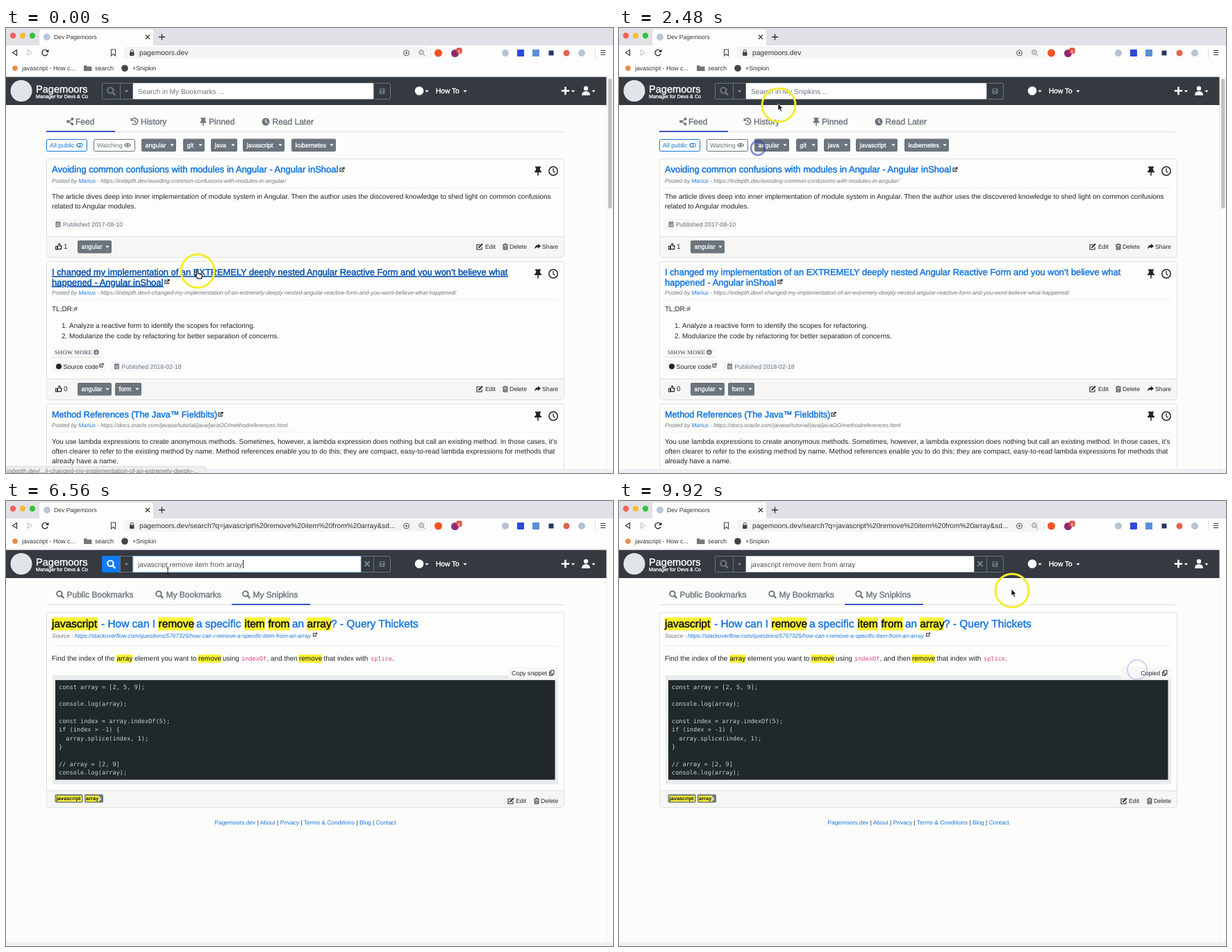
An HTML page for the animation above (10000 ms loop, 874 by 641 pixels).

```html
<!DOCTYPE html>
<html lang="en">
<head>
<meta charset="utf-8">
<title>Bookmark search</title>
<style>
  html, body { margin: 0; width: 100%; height: 100%; overflow: hidden; background: #fcfcfb; }
  svg { display: block; width: 874px; height: 641px; }
  text { font-family: "Liberation Sans", Arial, sans-serif; text-rendering: geometricPrecision; white-space: pre; }
  .mono { font-family: "DejaVu Sans Mono", monospace; }
  .serif { font-family: "Liberation Serif", serif; }
  .hover { fill: #0a55ad; stroke: #0a55ad; text-decoration: underline; }
</style>
</head>
<body>
<svg id="stage" viewBox="0 0 874 641"></svg>
<script>
const BLUE = '#1878dd', GREY = '#6c757d', DARK = '#212529', NAV = '#343a40', LINE = '#dfe0e1';

// Drawing helpers
const text = (x, y, s, size, fill = DARK, o = {}) =>
  `<text x="${x}" y="${y}" font-size="${size}" fill="${fill}"` +
  (o.medium ? ` stroke="${fill}" stroke-width="${o.medium}"` : '') +
  (o.italic ? ' font-style="italic"' : '') + (o.bold ? ' font-weight="700"' : '') +
  (o.anchor ? ` text-anchor="${o.anchor}"` : '') + (o.cls ? ` class="${o.cls}"` : '') +
  (o.id ? ` id="${o.id}"` : '') + `>${s}</text>`;
const rect = (x, y, w, h, fill, stroke = 'none', r = 0, extra = '') =>
  `<rect x="${x}" y="${y}" width="${w}" height="${h}" rx="${r}" fill="${fill}" stroke="${stroke}" ${extra}/>`;
const dot = (x, y, r, fill) => `<circle cx="${x}" cy="${y}" r="${r}" fill="${fill}"/>`;
const line = (d, color, w = 1, extra = '') =>
  `<path d="${d}" fill="none" stroke="${color}" stroke-width="${w}" ${extra}/>`;
const shape = (d, fill, extra = '') => `<path d="${d}" fill="${fill}" ${extra}/>`;
const at = (x, y, s) => `<g transform="translate(${x} ${y})">${s}</g>`;
const group = (id, s) => `<g id="${id}">${s}</g>`;

// Icons, centred on their position
const caret = (x, y, c = '#fff') => shape(`M${x - 2.7} ${y - 1.3}h5.4l-2.7 3z`, c);
const lens = (x, y, c, k = 1) => at(x, y, `<g transform="scale(${k})">` +
  `<circle cx="-1" cy="-1" r="3.6" fill="none" stroke="${c}" stroke-width="1.8"/>${line('M1.6 1.6L5 5', c, 2.2)}</g>`);
const pin = (x, y, c = DARK, k = 1) => at(x, y, `<g transform="scale(${k})">` +
  shape('M-4-6.5h8v2h-1.3l.5 3.5q2 .8 2 3h-4.4v4l-.8 1.5l-.8-1.5v-4h-4.4q0-2.2 2-3l.5-3.5h-1.3z', c) + '</g>');
const clock = (x, y) => `<circle cx="${x}" cy="${y}" r="6.2" fill="none" stroke="${DARK}" stroke-width="1.5"/>` +
  line(`M${x} ${y - 4}v4.3l2.6 2`, DARK, 1.3);
const external = (x, y, k = 1) => at(x, y, `<g transform="scale(${k})">` +
  line('M0-2.2h-3v5h5v-2.4M-1 1L3-3M.5-3h2.6v2.6', DARK, 1.1) + '</g>');
const calendar = (x, y) => rect(x - 3.5, y - 3.5, 7, 7.5, GREY, 'none', 1) +
  line(`M${x - 3} ${y - 1}h6M${x - 3} ${y + 1.4}h6M${x - 1} ${y - 1}v5M${x + 1.2} ${y - 1}v5`, '#f4f4f4', .6) +
  line(`M${x - 1.8} ${y - 5}v2M${x + 1.8} ${y - 5}v2`, GREY);
const edit = (x, y) => line(`M${x + 1} ${y - 3}h-5v7h7v-3.5`, DARK, 1.1) +
  line(`M${x - 1.6} ${y + 1.6}L${x + 4} ${y - 4}`, DARK, 1.9);
const trash = (x, y) => line(`M${x - 3.7} ${y - 2.8}h7.4M${x - 1.3} ${y - 4}h2.6M${x - 2.8} ${y - 2.4}v6.4h5.6v-6.4M${x - 1} ${y - 1}v4M${x + 1} ${y - 1}v4`, DARK, 1);
const share = (x, y) => shape(`M${x + 4.5} ${y - .8}l-4-3.4v2q-5 .2-4.6 5.6q1.4-2.8 4.6-2.6v2z`, DARK);
const thumb = (x, y) => rect(x - 4.6, y - .6, 2.2, 4.6, 'none', DARK) +
  line(`M${x - 1.6} ${y + 3.6}v-4l2-4q2 0 1 3.2h2.6l-.7 4.8z`, DARK, 1.2);
const save = (x, y) => rect(x - 4, y - 4, 8, 8, GREY, 'none', 1) + rect(x - 2.4, y - 3, 4, 2.2, NAV) + dot(x, y + 1.8, 1.2, NAV);

const pill = (x, y, w, label) => rect(x, y, w, 18.5, GREY, 'none', 2) +
  text(x + 5.5, y + 12.3, label, 9, '#fff', { medium: .3 }) + caret(x + w - 6, y + 9);
const title = (id, rows) => `<g id="${id}">` +
  rows.map(([y, s, size]) => text(66, y, s, size, BLUE, { medium: .5 })).join('') + '</g>';
const posted = (y, url) => text(66, y, `Posted by <tspan fill="${BLUE}">Marius</tspan> - ${url}`, 8.17, GREY, { italic: true });
const rule = y => line(`M66 ${y}h729`, LINE, 1, 'stroke-dasharray="1 1"');
const published = (x, y, date) => rect(x - 5, y - 8, 102, 16, '#f6f7f8', 'none', 2) + calendar(x + 4, y) +
  text(x + 11, y + 3.1, 'Published ' + date, 8.8, GREY);
const card = (y, h, foot) => rect(58.5, y + .5, 745, h, '#fdfdfc', LINE, 3) +
  (foot ? rect(59, foot, 744, y + h - foot, '#f6f6f5') + line(`M59 ${foot + .5}h744`, LINE) : '');
const cardFoot = (y, likes) => thumb(76, y) + text(83, y + 3.4, likes, 10) + pill(103, y - 9, 49, 'angular') +
  edit(682, y) + text(690, y + 3.2, 'Edit', 8.7) + trash(719, y) + text(725, y + 3.2, 'Delete', 8.7) +
  share(765.5, y) + text(772, y + 3.2, 'Share', 8.7);
const corner = y => pin(766, y) + clock(788, y);
const body = (y, s, x = 66) => text(x, y, s, 9.97);
const tabBar = (x, w) => line('M58 149.500h746', LINE) + rect(x, 148, w, 2, '#3b52c4');

const URL_SHORT = 'pagemoors.dev';
const URL_LONG = URL_SHORT + '/search?q=javascript%20remove%20item%20from%20array&amp;sd...';
const QUERY = 'javascript remove item from array';

const browser = rect(0, 0, 874, 641, '#fcfcfb') + rect(0, 0, 874, 25, '#dfe1e6') +
  shape('M48 25V5q0-3 3-3H209q3 0 3 3V25z', '#fdfdfd') +
  ['#f25f57', '#f8bc30', '#34c23f'].map((c, i) => dot(10 + 14 * i, 11, 4.2, c)).join('') +
  dot(59, 13, 5, '#b8c8d8') + text(69, 16.2, 'Dev Pagemoors', 8.65, '#333') +
  line('M201 10l6 6m0-6l-6 6', '#333', 1.2) + line('M224.500 8.500v9m-4.500-4.500h9', '#333', 1.3) +
  rect(0, 25, 874, 46, '#fdfdfd') +
  line('M15.500 31.500v8l-6-4z', '#333', 1.2) + line('M31.500 31.500v8l6-4z', '#bbb') +
  line('M59.500 33a4.200 4.200 0 1 0 .6 4', '#333', 1.4) + shape('M61.500 30.500v4.500h-4.500z', '#333') +
  line('M151.500 31h6v9l-3-2.500l-3 2.500z', '#444', 1.1) +
  rect(170, 27, 438, 17, '#f3f4f5', 'none', 4) +
  rect(178, 34.5, 6.5, 5.5, '#444', 'none', 1) + line('M179.500 35v-2a1.800 1.800 0 0 1 3.600 0v2', '#444') +
  `<circle cx="576.500" cy="36" r="4" fill="none" stroke="#555"/>` + line('M574.500 36h4m-2-2v4', '#555') +
  `<circle cx="598" cy="35" r="3.300" fill="none" stroke="#777"/>` + line('M596.500 35h3M600.500 37.500l2.500 2.500', '#777') +
  line('M611.500 29v14M848.500 29v14', '#ddd') +
  dot(622.5, 36, 5.5, '#f05423') + dot(646.5, 36.5, 5.5, '#8c2a70') + rect(648.5, 28.5, 8, 8.5, '#e0493c', 'none', 2) +
  text(652.5, 35.5, '6', 7, '#fff', { anchor: 'middle' }) +
  dot(719, 36, 5, '#b5c3d2') + rect(736, 31, 10, 10, '#2d49d8', 'none', 1) + rect(758, 31, 10, 10, '#5b8fd8') +
  rect(781.5, 32.5, 7, 7, '#263763') + dot(807, 36, 4.5, '#e1644d') + dot(829, 36, 5, '#b5c3d2') +
  line('M856 32.500h7M856 35.500h7M856 38.500h7', '#333', 1.2) +
  dot(13, 58, 3.8, '#e78b46') + text(23, 60.7, 'javascript - How c...', 8.8, '#333') +
  shape('M112 54h4l1 1.500h6.500v6.500h-11.500z', '#777') + text(128, 60.7, 'search', 9, '#333') +
  dot(171, 58, 4.8, '#444') + text(182, 60.7, '+Snipkin', 8.9, '#333') +
  text(192, 39.2, URL_SHORT, 10.2, '#333', { id: 'address' });

const navbar = rect(0, 70.5, 864.5, 40.5, NAV) + dot(22, 90.5, 15.5, '#dfe5e9') +
  text(43, 92.8, 'Pagemoors', 14.6, '#fff', { medium: .4 }) +
  text(43, 100.8, 'Manager for Devs &amp; Co', 7.2, '#fff', { medium: .25 }) +
  group('searchIdle', rect(138.5, 79.5, 26, 23, 'none', GREY, 2) + lens(151.5, 91, GREY, 1.15)) +
  group('searchReady', rect(138, 79, 27, 24, '#0f7bf5', 'none', 2) + lens(151.5, 91, '#fff', 1.15)) +
  rect(164.5, 79.5, 18, 23, 'none', GREY, 0, 'id="toggle"') + caret(173.5, 91, '#8d959b') +
  rect(183, 79.3, 346, 23.2, '#fff', 'none', 0, 'id="input"') +
  group('focusLine', line('M183 79.500h328v23h-328z', '#9cc9ea', 1)) +
  text(190, 94.5, '', 10.15, '#6c757d', { id: 'field' }) + rect(341.5, 85, 1, 12, '#222', 'none', 0, 'id="beam"') +
  group('clear', rect(511.5, 79.5, 18, 23, NAV, GREY) + line('M516.500 87l7 7m0-7l-7 7', '#7f878d', 1.8)) +
  rect(529.5, 79.5, 24, 23, 'none', GREY, 2) + save(541.5, 91) +
  dot(595, 90.5, 6.3, '#fff') + caret(606, 91) + text(619, 94.3, 'How To', 10.2, '#fff', { medium: .35 }) + caret(661, 91) +
  line('M805.500 84.800v11.400m-5.700-5.700h11.400', '#fff', 2.6) + caret(816.5, 91) +
  dot(835, 87, 3.2, '#fff') + shape('M829 97q0-6 6-6t6 6z', '#fff') + caret(846, 91);

const tab = (x, s) => text(x, 139.2, s, 12, GREY, { medium: .4 });
const feed = tabBar(58, 99) +
  line('M96 131l-6.500 3.700l6.500 3.700', GREY, 1.4) + dot(95.5, 131, 2, GREY) + dot(89, 134.7, 2, GREY) + dot(95.5, 138.4, 2, GREY) +
  tab(100, 'Feed') + line('M181.300 132a4.600 4.600 0 1 1 .4 5.500M185.500 132v3l2 1.500', GREY, 1.5) + shape('M179.500 129.500v4.500h4.500z', GREY) +
  tab(194, 'History') + pin(284, 135, GREY, .9) + tab(292, 'Pinned') +
  dot(374, 135, 5.5, GREY) + line('M374 131.500v3.700l2.400 1.600', '#fff', 1.3) + tab(383.5, 'Read Later') +
  rect(58.5, 160.5, 58, 17, 'none', BLUE, 2) + text(63, 172, 'All public', 8.9, BLUE) +
  rect(102, 166.3, 8.5, 5, 'none', BLUE, 2.5) + `<circle cx="104.500" cy="168.800" r="2.500" fill="none" stroke="${BLUE}"/>` +
  rect(126.5, 160.5, 59, 17, 'none', GREY, 2) + text(131, 172, 'Watching', 8.9, GREY) +
  line('M170.500 168.800q4.500-5.400 9 0q-4.500 5.400-9 0z', GREY, 1.2) + dot(175, 168.8, 1.6, GREY) +
  [[195, 50, 'angular'], [255, 31, 'git'], [295, 38, 'java'], [341, 60, 'javascript'], [411, 64, 'kubernetes']]
    .map(([x, w, s]) => pill(x, 159.5, w, s)).join('') +
  card(188, 142, 300) + title('title1', [[208, 'Avoiding common confusions with modules in Angular - Angular inShoal', 13]]) +
  external(484, 204) + corner(206) + posted(222.6, 'https://indepth.dev/avoiding-common-confusions-with-modules-in-angular/') + rule(230) +
  body(245.8, 'The article dives deep into inner implementation of module system in Angular. Then the author uses the discovered knowledge to shed light on common confusions') +
  body(260.3, 'related to Angular modules.') + published(71, 283, '2017-08-10') + cardFoot(315, '1') +
  card(336, 199, 505) + title('title2', [
    [356.3, 'I changed my implementation of an EXTREMELY deeply nested Angular Reactive Form and you won’t believe what', 12.86],
    [370.8, 'happened - Angular inShoal', 13]]) +
  external(232, 365.5) + corner(354) +
  posted(384, 'https://indepth.dev/i-changed-my-implementation-of-an-extremely-deeply-nested-angular-reactive-form-and-you-wont-believe-what-happened/') +
  rule(391) + body(407.5, 'TL;DR:#') +
  ['Analyze a reactive form to identify the scopes for refactoring.', 'Modularize the code by refactoring for better separation of concerns.']
    .map((s, i) => body(432.2 + 14.5 * i, `${i + 1}.`, 80) + body(432.2 + 14.5 * i, s, 91)).join('') +
  rect(66, 460, 73, 14, '#f8f8f7') + line('M66 474.500h73', LINE) +
  text(70, 470, 'SHOW MORE', 8.4, GREY, { cls: 'serif', bold: true }) + dot(130, 467, 3.8, GREY) + line('M130 464.800v4m-1.800-1.600l1.800 1.800l1.800-1.800', '#fff', .9) +
  rect(67, 479, 78, 16, '#f6f7f8', 'none', 2) + dot(76, 487.5, 4, DARK) + text(82.5, 490.6, 'Source code', 9, DARK) + external(137.5, 486, .85) +
  published(155.5, 487.5, '2018-02-18') + cardFoot(520, '0') + pill(157, 511, 38, 'form') +
  card(541, 110) + title('title3', [[561, 'Method References (The Java™ Fieldbits)', 12.7]]) + external(309, 556.5) + corner(559) +
  posted(574.8, 'https://docs.oracle.com/javase/tutorial/java/javaOO/methodreferences.html') + rule(582) +
  body(599, "You use lambda expressions to create anonymous methods. Sometimes, however, a lambda expression does nothing but call an existing method. In those cases, it's") +
  body(613.2, 'often clearer to refer to the existing method by name. Method references enable you to do this; they are compact, easy-to-read lambda expressions for methods that') +
  body(627.4, 'already have a name.') + rect(867, 73, 5.5, 187, '#c3c3c4', 'none', 2.7);

// Runs of text; those with a width are highlighted
const runs = (y, size, h, list, color, o) => list.map(([x, s, w]) =>
  (w ? rect(x - .5, y - h * .77, w, h, '#fcf536') : '') + text(x, y, s, size, w ? '#111' : color, o)).join('');
const code = ['const array = [2, 5, 9];', '', 'console.log(array);', '', 'const index = array.indexOf(5);', 'if (index &gt; -1) {',
  '  array.splice(index, 1);', '}', '', '// array = [2, 9]', 'console.log(array);'];
const link = s => `<tspan fill="${BLUE}">${s}</tspan>`;

const resultTabs = tabBar(325, 113) +
  [[72, 'Public Bookmarks'], [215, 'My Bookmarks'], [340, 'My Snipkins']]
    .map(([x, s]) => lens(x + 6, 134.7, GREY, 1.05) + tab(x + 15.5, s)).join('');
const result = card(160, 281, 417) +
  runs(182.2, 15.45, 19, [[66, 'javascript', 67], [137, '- How can I'], [219.5, 'remove', 51], [274, 'a specific'],
    [343.5, 'item', 30], [377.5, 'from', 32], [412, 'an'], [433.5, 'array', 35], [468, '? - Query Thickets']], BLUE, { medium: .5 }) +
  text(66, 196.5, 'Source - ', 8.22, GREY, { italic: true }) +
  text(99, 196.5, 'https://stackoverflow.com/questions/5767325/how-can-i-remove-a-specific-item-from-an-array', 8.22, BLUE, { italic: true }) +
  external(445, 192.5, .85) + rule(209) +
  runs(230.4, 9.97, 12, [[66, 'Find the index of the'], [159.5, 'array', 23], [185, 'element you want to'], [277, 'remove', 33],
    [312, 'using'], [375.5, ', and then'], [422, 'remove', 33], [457.5, 'that index with'], [556, '.']], DARK) +
  text(339, 230.2, 'indexOf', 8.6, '#d8428a', { cls: 'mono' }) + text(525, 230.2, 'splice', 8.6, '#d8428a', { cls: 'mono' }) +
  rect(67, 251, 728, 157, '#e9ecee') + rect(723, 239, 72, 17, '#f7f7f7', 'none', 2) +
  text(779, 250.7, 'Copy snippet', 8.74, DARK, { anchor: 'end', id: 'copy' }) +
  line('M784.500 244h4.500v5.500h-4.500zM784 246h-1.500v5.500h4.500v-1.500', DARK, 1) +
  rect(71, 258, 719.5, 143.5, '#20282a') +
  code.map((s, i) => text(76, 270.8 + 12.32 * i, s, 8.58, '#c9d0d3', { cls: 'mono' })).join('') +
  rect(70.5, 422.5, 40, 12, GREY, 'none', 2) + rect(72, 424.5, 37, 8.5, '#fcf536') + text(72.5, 431.3, 'javascript', 7.5, '#111', { bold: true }) +
  rect(113, 422.5, 27, 12, GREY, 'none', 2) + rect(114.5, 424.5, 20, 8.5, '#fcf536') +
  text(115, 431.3, 'array<tspan fill="#fff">s</tspan>', 7.5, '#111', { bold: true }) +
  edit(727, 432) + text(734, 435.2, 'Edit', 8.7) + trash(764, 432) + text(770, 435.2, 'Delete', 8.7) +
  text(431, 466, ['Pagemoors.dev', 'About', 'Privacy', 'Terms &amp; Conditions', 'Blog', 'Contact'].map(link).join(' | '), 8.43, DARK, { anchor: 'middle' });

const menu = rect(138.5, 104.5, 122, 78, '#fff', '#d0d0d0', 2) +
  rect(139, 159, 121, 19, '#f0f1f2', 'none', 0, 'id="menuHover"') + line('M139 153.500h121', '#e6e8ea') +
  [[122.3, 'My Bookmarks'], [141.8, 'Public Bookmarks'], [171.8, 'My Snipkins']]
    .map(([y, s]) => lens(157.5, y - 3.6, DARK, .9) + text(165.5, y, s, 10.1)).join('') +
  line('M235.500 119l3 3l6-6.500', DARK, 2.2);

const arrow = shape('M-1-2v9.500l2.200-2l1.700 3.800l1.700-.8l-1.700-3.600h3z', '#111', 'stroke="#fff" stroke-width=".6"');
const hand = shape('M-2-1.500q1.300-1.300 2 0v3.500l4.500 1q1.200.4.900 2l-.8 3.500h-5l-3.200-3.700q.3-1.400 1.600-.4z', '#fff', 'stroke="#111" stroke-width="1.100"');
const ibeam = line('M-2-5q2 0 2 1.500v7q0 1.500-2 1.500M2-5q-2 0-2 1.500M2 5q-2 0-2-1.500', '#222', 1);

document.getElementById('stage').innerHTML = browser + group('feed', feed) + group('tabs', resultTabs) + group('result', result) +
  rect(864.5, 70.5, .7, 566, '#e8e8ea') + rect(0, 636, 874, 5, '#f1f1f5') + line('M0 636h874', '#e2e2e7', .7) + navbar + group('menu', menu) +
  group('status', rect(-2, 631.5, 290, 12, '#eeeef0', '#dcdce0', 2) + text(1, 641, 'indepth.dev/.../i-changed-my-implementation-of-an-extremely-deeply-...', 8.8, '#777')) +
  '<circle id="ripple" fill="none" stroke="#2b37c4" stroke-width="2.600"/>' +
  group('pointer', '<circle id="ring" r="24" fill="none" stroke="#f3ee2e" stroke-width="3"/>' +
    group('arrow', arrow) + group('hand', hand) + group('ibeam', ibeam));

const el = {};
document.querySelectorAll('[id]').forEach(n => el[n.id] = n);
const show = (id, on) => el[id].setAttribute('display', on ? 'inline' : 'none');
const set = (id, attrs) => { for (const k in attrs) el[id].setAttribute(k, attrs[k]); };
const within = (t, spans) => spans.some(([a, b]) => t >= a && t < b);

const path = [[0, 276, 350], [40, 276, 350], [880, 178, 96], [1240, 178, 96], [1560, 222, 168], [1760, 201, 173],
  [2320, 200, 173], [2480, 230, 111], [2960, 233, 101], [6880, 233, 101], [7680, 265, 160], [7880, 490, 160],
  [8120, 631, 185], [8280, 631, 185], [8520, 737, 222], [9000, 746, 243], [9640, 746, 243], [9920, 566, 129], [10000, 566, 129]];
const clicks = [[908, 178, 96], [2296, 200, 173], [2900, 235, 103], [9612, 746, 243]];
const keys = [[3240, 1], [3440, 2], [3680, 3], [3760, 4], [3880, 5], [4080, 7], [4160, 8], [4240, 9], [4400, 10], [4480, 12], [4960, QUERY.length]];

function position(t) {
  const i = path.findIndex((p, n) => n && t <= p[0]);
  const [a, b] = [path[i - 1], path[i]], u = (t - a[0]) / (b[0] - a[0]), k = u * u * (3 - 2 * u);
  return [a[1] + (b[1] - a[1]) * k, a[2] + (b[2] - a[2]) * k];
}

function drawField(t) {
  const typed = keys.reduce((n, [time, count]) => t >= time ? count : n, 0);
  const focused = t >= 2900 && t < 9240;
  el.field.textContent = typed ? QUERY.slice(0, typed) : `Search in My ${t < 2300 ? 'Bookmarks' : 'Snipkins'} ...`;
  set('field', { fill: typed ? '#495057' : GREY });
  set('input', { width: typed ? 328 : 346 });
  set('beam', { x: typed ? 190.8 + el.field.getComputedTextLength() : 189.5 });
  show('beam', focused && (t < 5585 || Math.floor((t - 5585) / 492) % 2));
  show('clear', typed);
  show('focusLine', typed && focused);
  show('searchReady', typed && focused);
  show('searchIdle', !(typed && focused));
}

function drawPointer(t) {
  const [x, y] = position(t), searching = t >= 5960;
  const over = (x0, y0, x1, y1) => x >= x0 && x <= x1 && y >= y0 && y <= y1;
  const titles = [over(66, 197, 478, 211), over(66, 345, 718, 372), over(66, 550, 303, 564)].map(on => on && !searching);
  titles.forEach((on, i) => el['title' + (i + 1)].querySelectorAll('text').forEach(n => n.classList.toggle('hover', on)));
  const menuOpen = t >= 908 && t < 2300;
  const input = over(183, 79, 511, 103) && !menuOpen;
  const clickable = titles.includes(true) || over(138, 79, 182, 103) || (menuOpen && over(138, 159, 261, 178)) ||
    (searching && over(723, 239, 795, 256));
  set('pointer', { transform: `translate(${x} ${y})` });
  set('hand', { transform: 'translate(.5 1.5) scale(1.1)' });
  show('ibeam', input);
  show('hand', clickable && !input);
  show('arrow', !clickable && !input);
  show('ring', within(t, [[0, 880], [1240, 2240], [2400, 2880], [6880, 9240], [9680, 10000]]));
  show('menu', menuOpen);
  show('menuHover', menuOpen && over(138, 159, 261, 178));
  set('toggle', { fill: menuOpen ? GREY : 'none' });

  const click = clicks.find(([time]) => t >= time && t < time + 400);
  const pressed = t >= 9240 && t < 9612;
  show('ripple', click || pressed);
  if (click) {
    const k = (t - click[0]) / 400;
    set('ripple', { cx: click[1], cy: click[2], r: 4 + 13 * k, opacity: Math.max(0, Math.min(1, 1.2 - 1.3 * k)), 'stroke-width': 3 - k });
  } else if (pressed) set('ripple', { cx: 746, cy: 243, r: 5, opacity: 1, 'stroke-width': 3 });
}

function render(t) {
  const searching = t >= 5960;
  show('feed', !searching);
  show('tabs', searching);
  show('result', t >= 6240);
  show('status', t < 400);
  el.address.innerHTML = searching ? URL_LONG : URL_SHORT;
  el.copy.textContent = t < 9400 ? 'Copy snippet' : 'Copied';
  drawField(t);
  drawPointer(t);
}

const start = performance.now();
function tick() {
  render((performance.now() - start) % 10000);
  requestAnimationFrame(tick);
}
tick();
</script>
</body>
</html>
```
